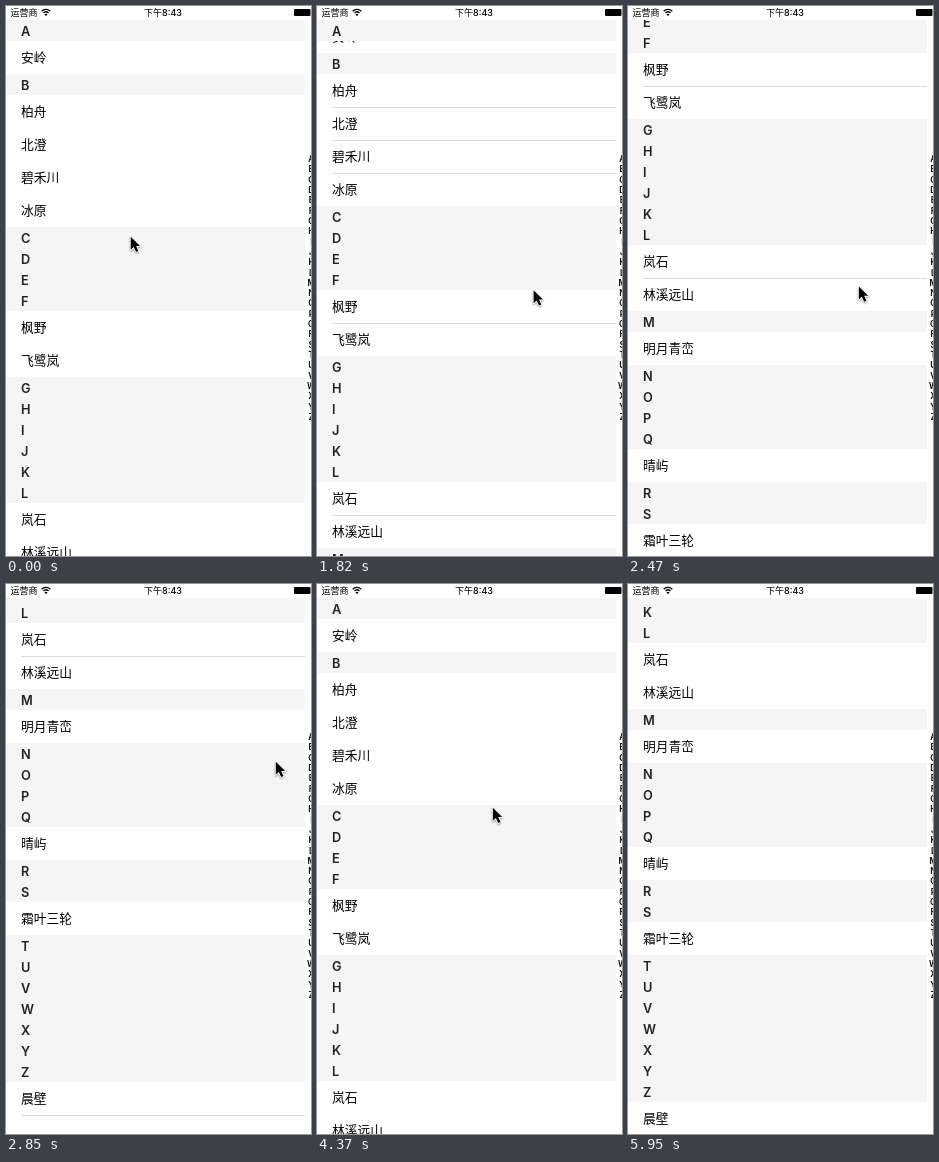
Recreate the animation shown at these times as an HTML page with a canvas. Size 305 by 550 pixels, loop 6390 ms.

```html
<!DOCTYPE html>
<html lang="zh-CN">
<head>
<meta charset="utf-8">
<style>
html, body { margin: 0; width: 100%; height: 100%; overflow: hidden; background: #fff; }
canvas { display: block; }
</style>
</head>
<body>
<canvas id="stage" width="305" height="550"></canvas>
<script>
const ctx = document.getElementById('stage').getContext('2d');
const LOOP = 6390, TOP = 14, RIGHT = 299, HEAD = 21, ROW = 33, END = 438;
const FONT = 'Inter, "Noto Sans CJK SC", "Noto Sans CJK", sans-serif';
const LETTERS = [...'ABCDEFGHIJKLMNOPQRSTUVWXYZ'];
const ROWS = {
  A: ['安岭'], B: ['柏舟', '北澄', '碧禾川', '冰原'], F: ['枫野', '飞鹭岚'],
  L: ['岚石', '林溪远山'], M: ['明月青峦'], Q: ['晴屿'], S: ['霜叶三轮'], Z: ['晨壁']
};
const RULED = 'BS'; // sections closed by a full-width line

// Sections with their place in the scrolled content
let height = 0;
const sections = LETTERS.map(letter => {
  const rows = ROWS[letter] || [], top = height;
  height += HEAD + rows.length * ROW;
  return { letter, rows, top, bottom: height };
});

// Cursor moves: start, end, x, y; it rests in between
const MOVES = [
  [60, 200, 143, 234], [200, 430, 109, 243], [430, 580, 121, 253], [700, 750, 131, 253],
  [1140, 1330, 242, 212], [1330, 1440, 272, 177], [1440, 1740, 217, 288],
  [1790, 2070, 207, 247], [2070, 2470, 230, 280], [2470, 2850, 269, 177], [2850, 3300, 302, 152],
  [3900, 4010, 307, 172], [4160, 4400, 157, 230], [4400, 4790, 289, 423], [4820, 4910, 307, 424],
  [5210, 5270, 303, 411], [5780, 5950, 260, 552]
];

const progress = (t, start, end) => Math.max(0, Math.min(1, (t - start) / (end - start)));
const glide = (t, start, end) => Math.sin(progress(t, start, end) * Math.PI / 2);

function cursorAt(t) {
  let x = 124, y = 230;
  for (const [start, end, toX, toY] of MOVES) {
    const p = progress(t, start, end);
    x += (toX - x) * p;
    y += (toY - y) * p;
  }
  return [x, y];
}

// Two swipes, then a bounce back; taps on the index jump to A and to Z
function scrollAt(t) {
  if (t >= 5480) return END;
  if (t >= 3510) return 0;
  return 257 * glide(t, 1790, 2410) + 201 * glide(t, 2470, 2850) - 20 * glide(t, 2850, 3180);
}

function box(x, y, w, h, color) {
  ctx.fillStyle = color;
  ctx.fillRect(x, y, w, h);
}

function text(str, x, y, size, weight = 400, color = '#000', align = 'left') {
  ctx.font = `${weight} ${size}px ${FONT}`;
  ctx.textAlign = align;
  ctx.fillStyle = color;
  ctx.fillText(str, x, y);
}

function drawHeader(letter, y) {
  box(0, y, RIGHT, HEAD, '#f5f5f5');
  text(letter, 15, y + 15.6, 12.75, 600, '#222');
}

function drawList(scroll) {
  const moving = scroll !== 0 && scroll !== END;
  ctx.save();
  ctx.beginPath();
  ctx.rect(0, TOP, 305, 550);
  ctx.clip();
  for (const { letter, rows, top, bottom } of sections) {
    const y = Math.floor(TOP + top - scroll);
    rows.forEach((name, i) => {
      const rowTop = top + HEAD + i * ROW;
      text(name, 15, y + HEAD + i * ROW + 21.4, 12.75);
      const last = i === rows.length - 1, full = last && RULED.includes(letter);
      if (moving && (!last || full || bottom === height)) {
        const x = full ? 0 : 15;
        box(x, Math.ceil(TOP + rowTop + ROW - 1 - scroll), RIGHT - x, 1, '#dcdcdc');
      }
    });
    // The header sticks to the top until its section has passed
    const lowest = Math.floor(TOP + bottom - scroll) - HEAD;
    drawHeader(letter, Math.max(y, Math.min(TOP, lowest)));
  }
  ctx.restore();
}

function drawIndex() {
  LETTERS.forEach((c, i) => text(c, 305.3, 156 + i * 10.32, 8.25, 600, '#000', 'center'));
}

function drawStatus() {
  text('运营商', 4.5, 10.2, 9);
  text('下午8:43', 157, 10.2, 9, 500, '#000', 'center');
  ctx.strokeStyle = '#000';
  ctx.lineWidth = 1.3;
  for (const r of [3.4, 5.9]) {
    ctx.beginPath();
    ctx.arc(40, 9.3, r, -Math.PI * 0.76, -Math.PI * 0.24);
    ctx.stroke();
  }
  ctx.fillStyle = '#000';
  ctx.beginPath();
  ctx.moveTo(40, 10);
  ctx.arc(40, 10, 2.2, -Math.PI * 0.76, -Math.PI * 0.24);
  ctx.fill();
  ctx.beginPath();
  ctx.roundRect(288, 3, 16.5, 7, 1);
  ctx.fill();
}

const arrow = new Path2D('M0 0V15L3.5 11.7L6.2 17.4L8.8 16.3L6.2 10.7H10.8Z');
function drawCursor(x, y) {
  ctx.save();
  ctx.translate(x + 0.7, y + 0.8);
  ctx.scale(0.87, 0.87);
  ctx.lineJoin = 'round';
  ctx.lineWidth = 2;
  ctx.strokeStyle = '#fff';
  ctx.shadowColor = 'rgba(0,0,0,.4)';
  ctx.shadowBlur = 2;
  ctx.shadowOffsetY = 1;
  ctx.stroke(arrow);
  ctx.shadowColor = 'transparent';
  ctx.fillStyle = '#000';
  ctx.fill(arrow);
  ctx.restore();
}

const start = performance.now();
function draw() {
  const t = (performance.now() - start) % LOOP;
  box(0, 0, 305, 550, '#fff');
  drawList(scrollAt(t));
  drawIndex();
  drawStatus();
  drawCursor(...cursorAt(t));
  requestAnimationFrame(draw);
}
draw();
</script>
</body>
</html>
```
